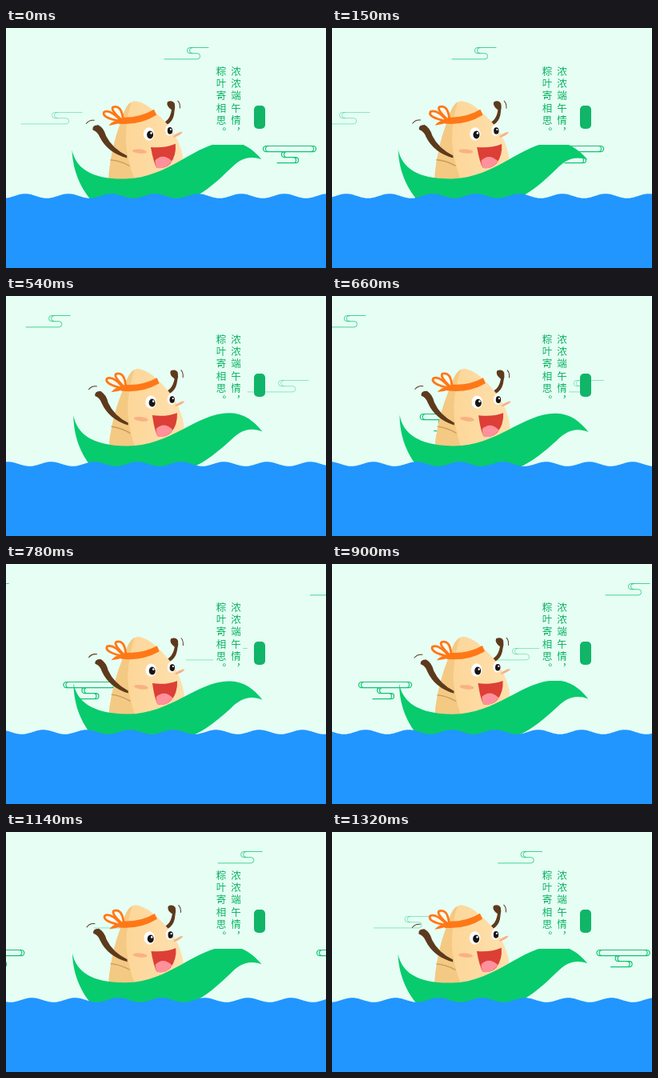
An HTML page that plays this animation: 400x300 px, repeating every 1350 ms.

```html
<!DOCTYPE html>
<html lang="zh-CN">
<head>
<meta charset="utf-8">
<style>
html, body { margin: 0; width: 100%; height: 100%; overflow: hidden; background: #e6fef4; }
svg { position: absolute; left: 0; top: 0; }
.verse {
  position: absolute; left: 259px; top: 47.5px; height: 98px; background: #e6fef4;
  writing-mode: vertical-rl; white-space: nowrap;
  font: 12.5px/18.5px "Noto Sans CJK SC", "Noto Sans CJK", sans-serif;
  letter-spacing: 2.7px; color: #0cb263;
}
.cloud { fill: none; stroke: #10c572; stroke-linecap: round; }
</style>
</head>
<body>
<svg width="400" height="300" viewBox="0 0 400 300">
  <defs>
    <path id="wisp" d="M55 0H32a3.6 3.6 0 0 0 0 7.2H41a3.6 3.6 0 0 1 0 7.2H0M35 0a3.6 3.6 0 0 0 0 7.2"/>
    <path id="pale" d="M76 0H42a3.6 3.6 0 0 0 0 7.2H56a3.6 3.6 0 0 1 0 7.2H0M45 0a3.6 3.6 0 0 0 0 7.2"/>
    <path id="curl" d="M63 0H4a3.6 3.6 0 0 0 0 7.2H63a3.6 3.6 0 0 0 0-7.2M7 0a3.6 3.6 0 0 0 0 7.2M60 0a3.6 3.6 0 0 1 0 7.2
      M27 7.2a3.5 3.5 0 0 0 0 7H41a3.5 3.5 0 0 1 0 7H18M30 7.2a3.5 3.5 0 0 0 0 7M38 14.2a3.5 3.5 0 0 1 0 7"/>
    <linearGradient id="dough" x2="1">
      <stop offset=".3" stop-color="#fdd79a"/><stop offset="1" stop-color="#fee0ae"/>
    </linearGradient>
  </defs>

  <g id="clouds" class="cloud"></g>

  <g id="boat">
    <!-- arms -->
    <g fill="#5d3a1c">
      <path d="M190 120Q206 121 209 103Q202 98 204 93Q210 90 213 95Q214 100 212.5 105Q211 124 190 124Z"/>
      <path fill="none" stroke="#5d3a1c" stroke-linecap="round" d="M217 92q3 3 2.500 9M102 118q4-5 10-4"/>
    </g>
    <!-- dumpling -->
    <path fill="url(#dough)" d="M128 192Q130 163 139 134L149 106Q155 92 163 91Q171 92 180 98Q196 111 206 124Q219 142 222 162Q223 178 216 192Z"/>
    <path fill="#f4c983" d="M128 192Q130 163 139 134L149 106Q153 95 159 92Q152 112 151 140Q152 166 162 192Z"/>
    <path fill="none" stroke="#c79c5c" stroke-width="1.3" d="M131 164Q143 165 155 172"/>
    <path fill="#5d3a1c" d="M152 159Q134 150 126.500 134Q124 124 117 120Q109 120 110 126Q116 128 118.500 135Q128 155 152 162Z"/>

    <g fill="#ff7817">
      <path d="M144 111Q168 113 187 102L190 109Q168 122 142 119Z"/>
      <g fill="#f6fbee" stroke="#ff7817" stroke-width="2.800" stroke-linejoin="round">
        <path d="M145 115Q132 100 124.500 104Q121 111 145 116Z"/>
        <path d="M146 114Q132 101 136 98Q146 95 148 112Z"/>
      </g>
      <path d="M146 114Q135 114 130 121Q139 120 147 117Z"/>
    </g>

    <g fill="#f9b183">
      <ellipse cx="168" cy="154" rx="9" ry="2.600" transform="rotate(6 168 154)"/>
      <ellipse cx="216" cy="134" rx="6.500" ry="1.600" transform="rotate(-28 216 134)"/>
    </g>
    <g fill="#fff">
      <ellipse cx="180" cy="132.500" rx="6.800" ry="8.200"/>
      <ellipse cx="205.500" cy="128.500" rx="5" ry="6.800"/>
    </g>
    <g fill="#181513">
      <ellipse cx="181.500" cy="133.500" rx="4" ry="5"/>
      <ellipse cx="206.500" cy="129" rx="3.200" ry="4.300"/>
    </g>
    <g fill="#fff">
      <circle cx="183" cy="131.500" r="1.300"/>
      <circle cx="207.500" cy="127.500" r="1.100"/>
    </g>
    <path fill="#dc3f35" d="M182 149Q199 151 213 145.500Q214 160 206 170Q199 177 189 175Q185 168 182 149Z"/>
    <path fill="#ff919c" d="M187 166Q197 156 208 167Q200 178 189 175Q187 171 187 166Z"/>

    <path fill="#08cb6d" d="M83.500 150.500C88 174 108 188 150 188C205 188 238 144.500 279 144.500C297 144.500 309 154 320 167
      C303 161 292 167 281 178C266 192 250 206 234 213L222 222H114C96 205 84 180 83.500 150.500Z"/>
  </g>

  <path id="sea" fill="#2196ff"/>
  <rect x="310" y="97" width="14" height="29" rx="5" fill="#10b568"/>
</svg>
<div class="verse">浓浓端午情，<br>粽叶寄相思。</div>

<script>
const LOOP = 1350, STEP = 30, SPEED = 0.32, WAVE = 54;
const $ = id => document.getElementById(id);

// gap: distance to the copy that follows from the right
const clouds = [
  { shape: 'wisp', x: 198, y: 24.5, gap: 432, width: 1, opacity: .75 },
  { shape: 'pale', x: 19, y: 105.5, gap: 456, width: 1, opacity: .42 },
  { shape: 'curl', x: 321, y: 147.5, gap: 432, width: 1.2, opacity: 1 }
];

for (const c of clouds) {
  c.copies = [0, c.gap].map(shift => {
    const use = document.createElementNS('http://www.w3.org/2000/svg', 'use');
    use.setAttribute('href', '#' + c.shape);
    use.setAttribute('stroke-width', c.width);
    use.setAttribute('opacity', c.opacity);
    use.setAttribute('y', c.y);
    $('clouds').append(use);
    return { use, shift };
  });
}

function drawSea(crest) {
  let d = 'M0 300';
  for (let x = 0; x <= 400; x += 2) {
    const y = 210 - 2.8 * Math.cos((x - crest) / WAVE * 2 * Math.PI);
    d += `L${x} ${y.toFixed(2)}`;
  }
  $('sea').setAttribute('d', d + 'L400 300Z');
}

function draw(now) {
  const t = Math.floor(now % LOOP / STEP) * STEP;
  const progress = t / LOOP;
  for (const c of clouds) {
    for (const { use, shift } of c.copies) use.setAttribute('x', c.x + shift - SPEED * t);
  }
  const tilt = -1.2 * Math.cos(progress * 2 * Math.PI);
  $('boat').setAttribute('transform', `rotate(${tilt} 176 200)`);
  drawSea(24 - WAVE * progress);
}

const start = performance.now();
function tick() {
  draw(performance.now() - start);
  requestAnimationFrame(tick);
}
tick();
</script>
</body>
</html>
```
